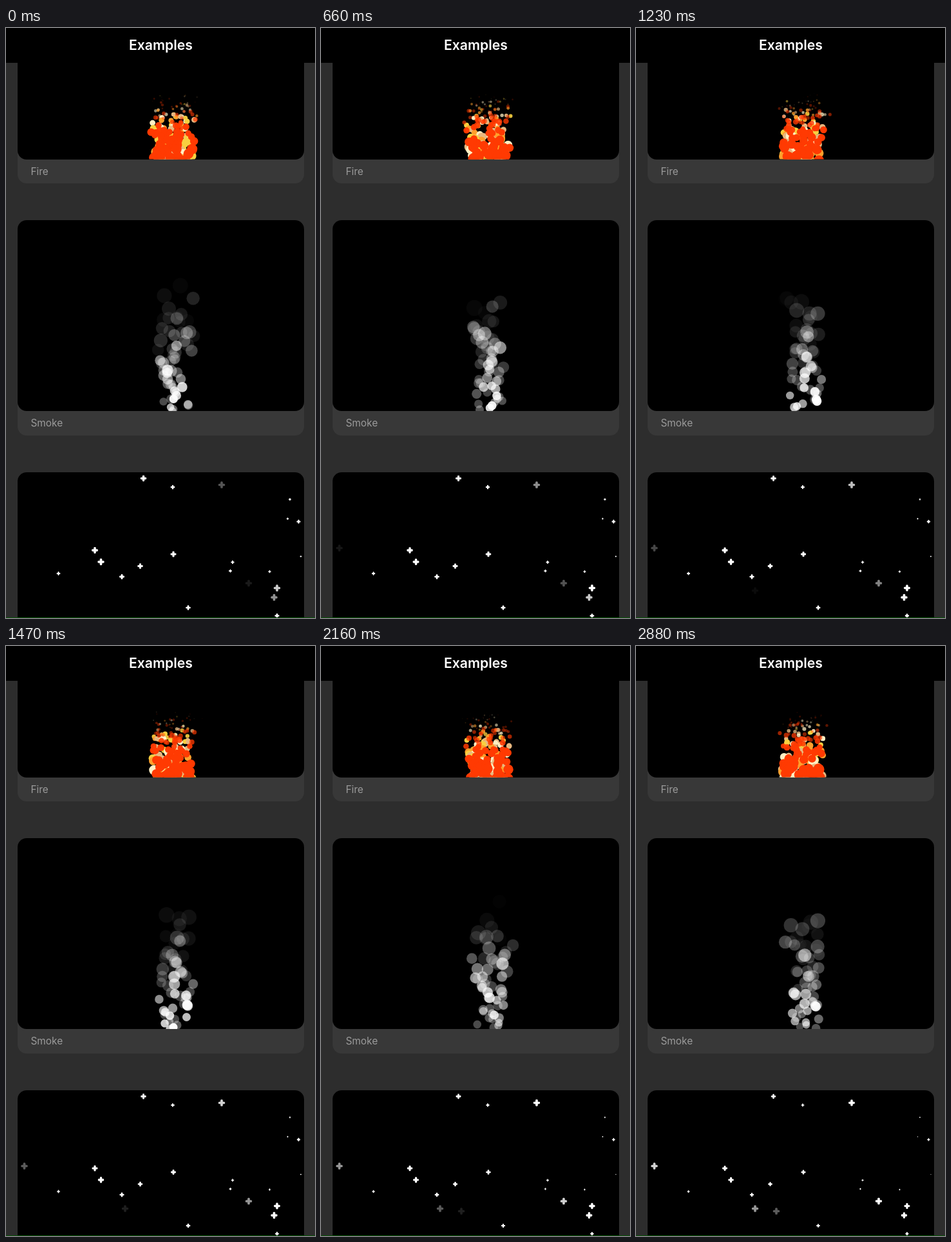
Recreate the animation shown at these times as an HTML page with a canvas. Size 480x915 px, loop 2910 ms.

```html
<!DOCTYPE html>
<html lang="en">
<head>
<meta charset="utf-8">
<title>Examples</title>
<style>
  html, body { margin: 0; width: 100%; height: 100%; overflow: hidden; background: #2d2d2d; }
  body { position: relative; font-family: Inter, Roboto, sans-serif; }
  header, .card, .view, canvas, .line { position: absolute; }
  header { left: 0; top: 0; width: 481px; height: 54px; background: #000; color: #fff;
    font-size: 21.2px; font-weight: 600; line-height: 53px; text-align: center; }
  .card { left: 18px; width: 445px; border-radius: 14px; background: #383838; color: #9b9b9b; font-size: 15.4px; }
  .view { left: 0; top: 0; width: 100%; height: 296px; border-radius: 14px; background: #000; }
  .card span { position: absolute; left: 20.5px; top: 305px; line-height: 20px; }
  canvas { left: 0; top: 0; }
  .line { left: 0; top: 914px; width: 480px; height: 1px; background: #075207; }
</style>
</head>
<body>
<div class="card" style="top:-92.5px;height:333.5px"><div class="view"></div><span>Fire</span></div>
<div class="card" style="top:298px;height:334px"><div class="view"></div><span>Smoke</span></div>
<div class="card" style="top:689px;height:334px"><div class="view"></div></div>
<canvas id="stage" width="480" height="915"></canvas>
<header>Examples</header>
<div class="line"></div>
<script>
const LOOP = 2910, STEP = 30, END = LOOP / 1000;
const ctx = document.getElementById('stage').getContext('2d');

function seeded(seed) {
  return () => {
    seed = (seed + 0x6D2B79F5) | 0;
    let n = Math.imul(seed ^ (seed >>> 15), 1 | seed);
    n = (n + Math.imul(n ^ (n >>> 7), 61 | n)) ^ n;
    return ((n ^ (n >>> 14)) >>> 0) / 4294967296;
  };
}

// Star centres, youngest first; one is born every STAR_GAP seconds
const STAR_GAP = .7, STAR_FADE = 3, STAR_SIZE = 10.4;
const stars = [
  [218, 876.5], [185, 872.5], [28.5, 806.5], [377, 861], [335, 708.5], [416.5, 883],
  [421, 868.5], [147.5, 828], [138, 810], [213.5, 698.5], [260, 816], [208.5, 834.5],
  [180, 851], [283, 899], [421, 911.5], [259, 712], [454.5, 765.5], [81.5, 846],
  [352, 828.5], [348.5, 842], [409.5, 843], [441, 731], [437.5, 761], [458, 819.5]
];

const SMOKE_Y = 594, SMOKE_RATE = 30;
const FIRE_Y = 207, FIRE_RATE = 170, FIRE_LIFE = 1.08;

// Births spread evenly from before the loop start to its end
function emit(rate, lead, make) {
  const count = Math.ceil((END + lead) * rate);
  return Array.from({ length: count }, (_, i) => ({ born: i / rate - lead, ...make() }));
}

function makeSmoke() {
  const rnd = seeded(23);
  return emit(SMOKE_RATE, 2.3, () => ({
    x: 239 + rnd() * 46,
    vx: (rnd() + rnd() - 1) * 15,
    vy: 76 + rnd() * 18,
    life: 1.4 + rnd() * .9,
    opacity: .28 + .72 * rnd() ** 2,
    scale: .9 + rnd() * .2
  }));
}

function makeFire() {
  const rnd = seeded(7);
  const tones = ['#fff0c4', '#ffa02c', '#e8b880', '#f8d040'];
  const list = emit(FIRE_RATE, FIRE_LIFE, () => {
    const hot = rnd() < .48;
    return {
      hot,
      color: hot ? '#ff3a02' : tones[Math.floor(rnd() * tones.length)],
      x: 229 + rnd() * 61,
      vx: (rnd() + rnd() - 1) * 17,
      vy: 82 + rnd() * 20,
      size: 6.6 + rnd() * 2.2
    };
  });
  return list.sort((a, b) => a.hot - b.hot);
}

const smoke = makeSmoke(), fire = makeFire();

function dot(x, y, r, color, alpha) {
  ctx.globalAlpha = Math.min(1, alpha);
  ctx.fillStyle = color;
  ctx.beginPath();
  ctx.arc(x, y, r, 0, 7);
  ctx.fill();
}

function inCard(top, paint) {
  ctx.save();
  ctx.beginPath();
  ctx.roundRect(18, top, 445, 296, 14);
  ctx.clip();
  paint();
  ctx.restore();
}

function drawFire(t) {
  for (const p of fire) {
    const age = t - p.born, u = age / FIRE_LIFE;
    if (u < 0 || u >= 1) continue;
    const r = p.size * (1 - u ** 1.2) + .5;
    const fade = (1 - u) * (p.hot ? 2 : 3);
    dot(p.x + p.vx * age, FIRE_Y - p.vy * age, r, p.color, fade);
  }
}

function drawSmoke(t) {
  for (const p of smoke) {
    const age = t - p.born, u = age / p.life;
    if (u < 0 || u >= 1) continue;
    const r = (6.2 + age * 2.5) * p.scale;
    dot(p.x + p.vx * age, SMOKE_Y - p.vy * age, r, '#fff', p.opacity * (1 - u ** 1.5));
  }
}

function drawStars(t) {
  ctx.fillStyle = '#fff';
  stars.forEach(([x, y], i) => {
    const age = t + STAR_GAP * i - 1.8;
    const size = STAR_SIZE - .65 * Math.max(0, age - STAR_FADE);
    if (age <= 0 || size <= 0) return;
    const arm = size * .36;
    ctx.globalAlpha = Math.min(1, age / STAR_FADE);
    ctx.beginPath();
    ctx.roundRect(x - size / 2, y - arm / 2, size, arm, arm * .4);
    ctx.roundRect(x - arm / 2, y - size / 2, arm, size, arm * .4);
    ctx.fill();
  });
}

function frame(now) {
  const t = Math.floor((now % LOOP) / STEP) * STEP / 1000;
  ctx.clearRect(0, 0, 480, 915);
  inCard(-92.5, () => drawFire(t));
  inCard(298, () => drawSmoke(t));
  inCard(689, () => drawStars(t));
}

const begin = performance.now();
function tick() {
  frame(performance.now() - begin);
  requestAnimationFrame(tick);
}
tick();
</script>
</body>
</html>
```
